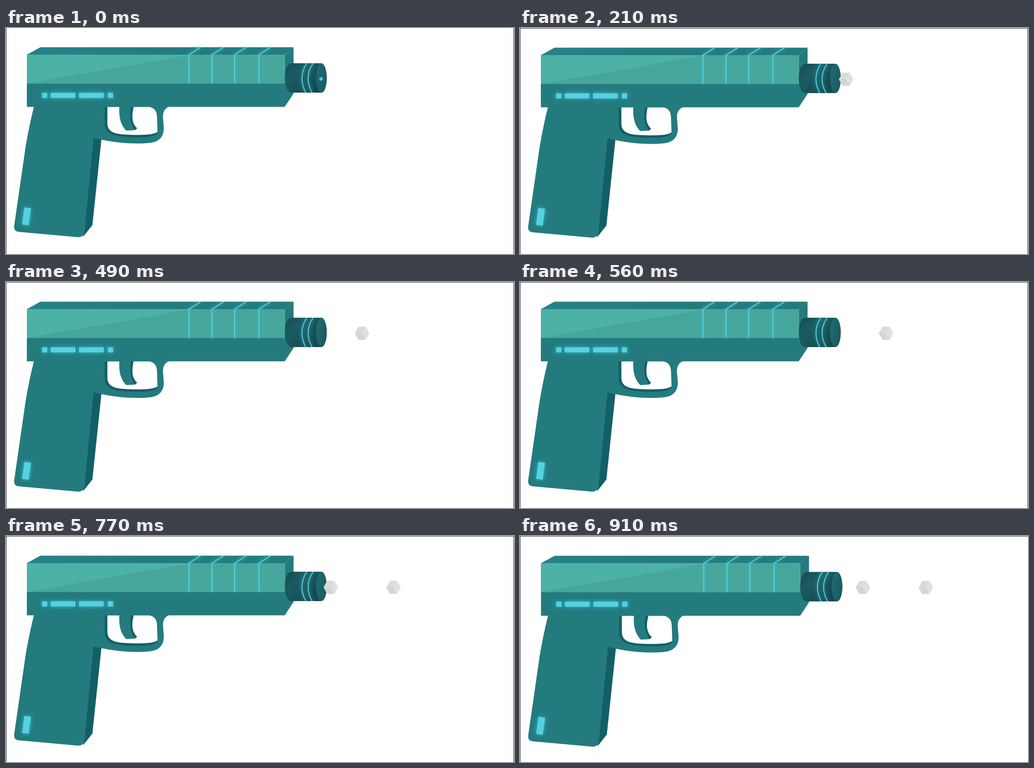
Recreate the animation shown at these times as an HTML page without scripts. Size 1120 px wide and 500 px high, loop 980 ms.

```html
<!DOCTYPE html>
<html lang="en">
<head>
<meta charset="utf-8">
<title>Pistol loop</title>
<style>
html, body { margin: 0; width: 100%; height: 100%; overflow: hidden; background: #fff; }
svg { display: block; width: 1120px; height: 500px; }

.body { fill: #247b7e; }
.dark { fill: #135f68; }
.glow { fill: #55d2e1; filter: drop-shadow(0 0 5px #35c3d3); }
.line { fill: none; stroke: #55d2e1; stroke-width: 2.1; filter: drop-shadow(0 0 4px #45c5d0); }

/* every part moves in 70 ms steps */
.scene, .shot, .spark { animation: 980ms step-end infinite; }
.scene { animation-name: scene; }
.first { animation-name: first; }
.second { animation-name: second; }
.spark { animation-name: spark; }

@keyframes scene {
  0% { transform: translateY(-1px); }
  7.14% { transform: none; }
  92.85%, 100% { transform: scale(1.005); }
}
@keyframes first {
  0% { transform: translate(695px, 112.5px) scale(0); }
  7.14% { transform: translate(701px, 113px) scale(.55); }
  14.28% { transform: translate(710px, 113.5px) scale(.85); }
  21.42% { transform: translate(719px, 113.5px); }
  28.57% { transform: translate(732px, 113.5px); }
  35.71% { transform: translate(745px, 113.5px); }
  42.85% { transform: translate(765px, 113.5px); }
  50% { transform: translate(785px, 113.5px); }
  57.14% { transform: translate(807px, 113.5px); }
  64.28% { transform: translate(828.7px, 113.5px); }
  71.42% { transform: translate(841px, 113.5px); }
  78.57% { transform: translate(854.3px, 113.5px); }
  85.71% { transform: translate(874px, 113.5px); }
  92.85%, 100% { transform: translate(894.7px, 113.8px); }
}
@keyframes second {
  0% { transform: translate(695px, 113px) scale(0); }
  71.42% { transform: translate(702px, 113px) scale(.6); }
  78.57% { transform: translate(716px, 113.5px); }
  85.71% { transform: translate(736px, 113.5px); }
  92.85%, 100% { transform: translate(756px, 113.8px); }
}
@keyframes spark {
  0% { opacity: 1; }
  7.14%, 100% { opacity: 0; }
}
</style>
</head>
<body>
<svg viewBox="0 0 1120 500">
  <defs>
    <linearGradient id="top">
      <stop offset="0" stop-color="#26828a"/>
      <stop offset=".5" stop-color="#247b7e"/>
    </linearGradient>
    <linearGradient id="barrel" x2=".9" y2=".8">
      <stop offset="0" stop-color="#174d54"/>
      <stop offset=".4" stop-color="#1b5b62"/>
      <stop offset="1" stop-color="#15474e"/>
    </linearGradient>
    <linearGradient id="bore" y1=".2" y2=".8">
      <stop offset="0" stop-color="#1e6c72"/>
      <stop offset="1" stop-color="#1a5960"/>
    </linearGradient>
    <path id="ring" d="M0 124V60L26 43.5"/>
    <g id="cube">
      <path fill="#d9dbda" d="M-16 0L-8-14.5H8L0 0Z"/>
      <path fill="#dfe0e0" d="M8-14.5L16 0L8 14.5L0 0Z"/>
      <path fill="#d4d6d5" d="M-16 0H0L8 14.5H-8Z"/>
    </g>
  </defs>

  <g class="scene">
    <rect x=".5" y=".5" width="1119" height="520" fill="none" stroke="#333"/>

    <!-- grip -->
    <path class="dark" d="M190 240L210.500 246L190.500 437L170 463Z"/>
    <path class="body" d="M61.500 175Q50 222 43 265L18 439Q17 451 28 452L158 463.700Q171 464.500 173 452L193 244L218 220V175Z"/>

    <!-- trigger guard -->
    <path class="body" d="M217 174H362C350 178 346 186 346 198L348 222C348 243 336 253 318 255C280 259 235 255 193 244Z"/>
    <path class="dark" d="M217.500 175.500H230V225H334V233C328 242 310 243.500 278 243C235 241 217.500 235 217.500 213Z"/>
    <path fill="#fff" d="M223.500 175.500H316C328 178 333 186 333 199L334 231C324 237 310 237.500 283 237.500C246 237 223.500 235 223.500 211Z"/>

    <!-- trigger -->
    <path class="body" d="M250 174C248 200 254 217 265 228L284 227L289 223C276 210 277 195 281.500 174Z"/>
    <path class="dark" d="M275.500 175.500C272 196 274 212 284 227L289 223C276 210 277 195 281.500 175.500Z"/>

    <!-- slide -->
    <path class="body" d="M46 123H614.500V60L634 43.500V146L614.500 175.500H46Z"/>
    <path fill="url(#top)" d="M46 60L76 43.500H634L614.500 60Z"/>
    <path fill="#46a69b" d="M46 60H614.500V124H46Z"/>
    <path fill="#4bb2a5" d="M46 60H410L46 124Z"/>
    <g class="line">
      <use href="#ring" x="403.300"/>
      <use href="#ring" x="454.200"/>
      <use href="#ring" x="504.200"/>
      <use href="#ring" x="557.500"/>
    </g>

    <!-- barrel -->
    <path fill="url(#barrel)" d="M628 79H695.500V144H628C610 140 610 83 628 79Z"/>
    <ellipse cx="695.500" cy="111.500" rx="11.800" ry="32.500" fill="url(#bore)"/>
    <path class="line" d="M663 79Q643 111 661 144M677 79Q656 111 675 144"/>

    <!-- lights -->
    <path class="glow" d="M79.500 144.500H91V155.700H79.500ZM98.500 144.500H153V155.700H98.500ZM161 144.500H215.500V155.700H161ZM224.500 144.500H236V155.700H224.500Z"/>
    <path class="glow" d="M40.500 398L55 400L50 437.500L35.500 435.500Z"/>
  </g>

  <circle class="spark" cx="694.700" cy="112.500" r="4" fill="#45c3d8"/>
  <use class="shot first" href="#cube"/>
  <use class="shot second" href="#cube"/>
</svg>
</body>
</html>
```
